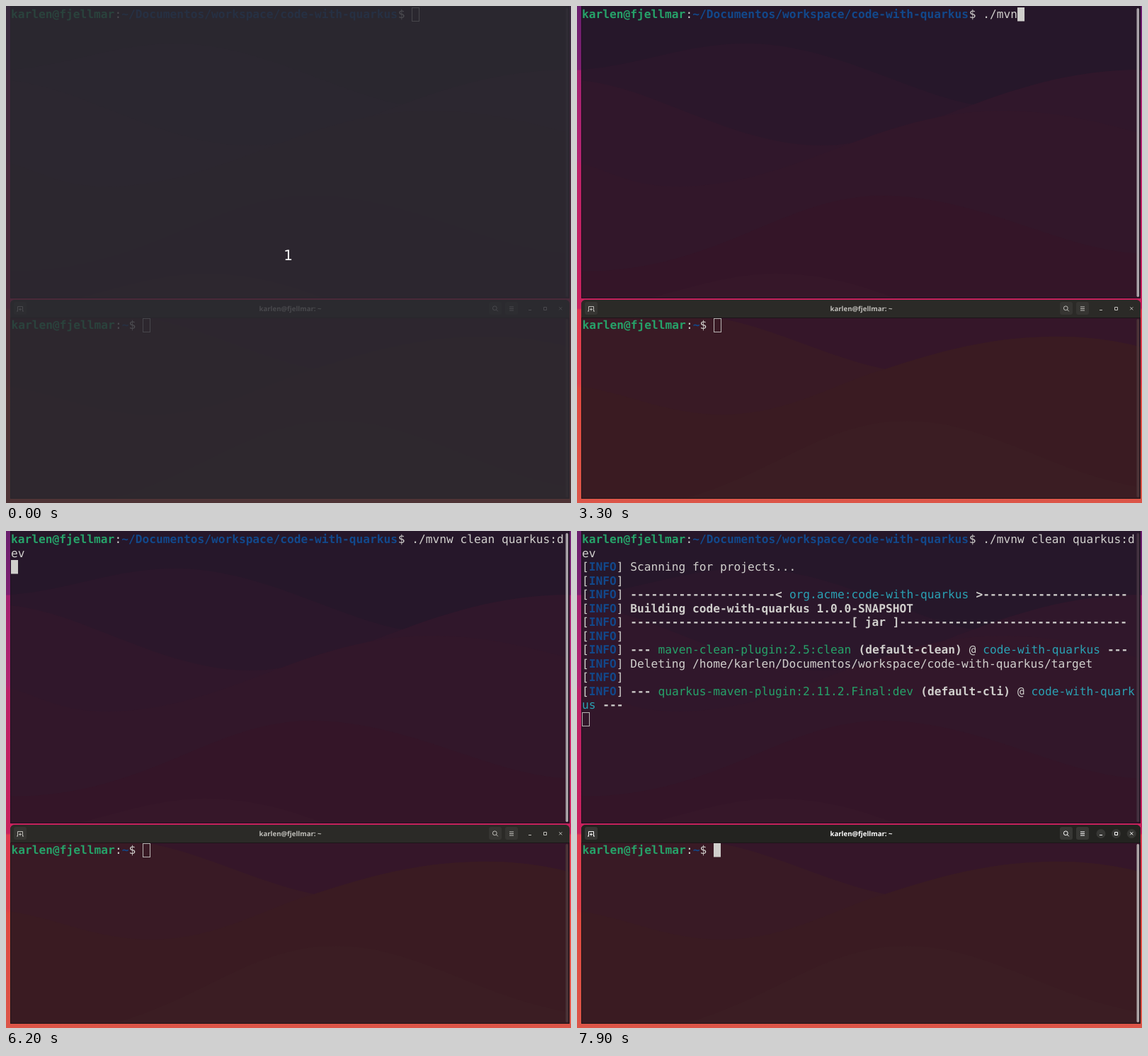
Recreate the animation shown at these times as an HTML page. Size 798 by 702 pixels, loop 8 s.

```html
<!DOCTYPE html>
<html lang="en">
<head>
<meta charset="utf-8">
<title>Terminal session</title>
<style>
  html, body { margin: 0; width: 100%; height: 100%; overflow: hidden; background: #2b172b; }
  svg { display: block; }
  text { white-space: pre; text-rendering: geometricPrecision; }
  .term { font: 16.21px "DejaVu Sans Mono", monospace; fill: #d0cfcc; }
  .b { font-weight: 700; }
  .p { font-weight: 700; fill: #26a269; }
  .d { font-weight: 700; fill: #12488b; }
  .g { fill: #26a269; }
  .c { fill: #2aa1b3; }
  .title { font: 700 9.6px "Noto Sans", "Open Sans", sans-serif; text-anchor: middle; }
  .count { font: 20px "DejaVu Sans", sans-serif; text-anchor: middle; fill: #fff; }
  .icon { fill: none; stroke: currentColor; }
</style>
</head>
<body>
<svg width="798" height="702" viewBox="0 0 798 702">
  <defs>
    <linearGradient id="wall" x1="0" y1="0" x2="0" y2="1">
      <stop offset="0" stop-color="#6a1f6e"/>
      <stop offset=".128" stop-color="#7d1f70"/>
      <stop offset=".13" stop-color="#a3216f"/>
      <stop offset=".31" stop-color="#b42471"/>
      <stop offset=".32" stop-color="#bd2268"/>
      <stop offset=".608" stop-color="#c8215c"/>
      <stop offset=".612" stop-color="#e03a50"/>
      <stop offset=".76" stop-color="#dd3f48"/>
      <stop offset=".77" stop-color="#e0483f"/>
      <stop offset="1" stop-color="#dc5548"/>
    </linearGradient>
    <clipPath id="topClip"><rect x="6" width="790" height="413"/></clipPath>
    <clipPath id="lowClip"><path d="M6 696V422Q6 415 13 415H789Q796 415 796 422V696Z"/></clipPath>
    <g id="buttons">
      <g class="icon">
        <path d="M16.5 431V424.5H23.5V431M15 431H17M23 431H25M20 426.5V430.5M18 428.5H22"/>
        <circle cx="690.3" cy="426.8" r="2.9"/>
        <path d="M692.5 429L694.8 431.3M711 425H717M711 427.5H717M711 430H717"/>
        <path d="M738 429.5H742M759.5 425.5H763.5V429.5H759.5ZM781.3 425.3L785.3 429.3M785.3 425.3L781.3 429.3"/>
      </g>
      <text class="title" x="401.5" y="431" fill="currentColor"></text>
    </g>
  </defs>

  <rect width="798" height="702" fill="url(#wall)"/>

  <g clip-path="url(#topClip)">
    <rect width="798" height="413" fill="#26172a"/>
    <path fill="#2b172b" d="M6 90C90 84 150 53 240 53C360 53 470 125 565 140C620 150 700 165 798 170V413H6Z"/>
    <path fill="#30172b" d="M6 105C110 115 220 197 345 197C480 197 600 90 798 90V413H6Z"/>
    <path fill="#32172a" d="M6 222C50 235 80 255 140 255C310 255 420 148 600 148C680 148 740 165 798 180V413H6Z"/>
    <path fill="#341528" d="M6 375C200 375 290 268 430 268C570 268 680 345 798 350V413H6Z"/>
    <path fill="#361729" d="M100 413C170 395 220 378 280 378C340 378 390 390 450 413Z"/>
    <path fill="none" stroke="#1c1020" d="M6.5 0V412.5H795.5V0"/>
  </g>

  <g clip-path="url(#lowClip)">
    <rect y="415" width="798" height="281" fill="#351629"/>
    <path fill="#391a25" d="M6 441H200C280 455 350 495 435 513C520 485 590 467 680 467C730 467 770 475 798 482V696H6Z"/>
    <path fill="#3a1b22" d="M6 537C80 550 130 577 205 577C300 577 370 530 435 513C520 485 590 467 680 467C730 467 770 475 798 482V696H6Z"/>
    <path fill="#3b1d23" d="M150 696C280 660 350 586 465 586C580 586 670 660 798 680V696Z"/>
    <rect y="415" width="798" height="26" fill="#2b2a27"/>
    <g fill="#363532">
      <rect x="11" y="418" width="18" height="18" rx="3"/>
      <rect x="682" y="418" width="18" height="18" rx="3"/>
      <rect x="705" y="418" width="18" height="18" rx="3"/>
    </g>
    <use href="#buttons" color="#c0bfba"/>
    <g id="active">
      <rect y="415" width="798" height="26" fill="#232320"/>
      <g fill="#373734">
        <rect x="11" y="418" width="18" height="18" rx="3"/>
        <rect x="682" y="418" width="18" height="18" rx="3"/>
        <rect x="705" y="418" width="18" height="18" rx="3"/>
        <circle cx="740" cy="427.5" r="6.5"/>
        <circle cx="761.5" cy="427.5" r="6.5"/>
        <circle cx="783.3" cy="427.5" r="6.5"/>
      </g>
      <use href="#buttons" color="#fff"/>
    </g>
    <path fill="none" stroke="#1c1518" d="M6 440.5H796M6.5 441V695.5H795.5V441"/>
  </g>

  <rect id="topBar" x="790.5" y="3" width="3.5" height="408" rx="1.7"/>
  <rect id="lowBar" x="790.5" y="442" width="3.5" height="252" rx="1.7"/>
  <g id="screen" class="term"></g>
  <rect id="topCursor"/>
  <rect id="lowCursor"/>

  <g id="veil">
    <rect width="798" height="702" fill="#2b2b31" opacity=".8"/>
    <text class="count" x="398.5" y="359">1</text>
  </g>
</svg>

<script>
const LOOP = 8000, CW = 9.763, LH = 19.5, LEFT = 7, TOP = 2;
const USER = "karlen", HOST = "fjellmar";
const COMMAND = "./mvnw clean quarkus:dev", WRAP = 22;
const $ = id => document.getElementById(id);
const dash = n => "-".repeat(n);

// Runs alternate style and text; an empty style is plain.
const info = (...runs) => ["", "[", "d", "INFO", "", "] ", ...runs];
const prompt = dir => ["p", `${USER}@${HOST}`, "", ":", "d", dir, "", "$ "];
const output = [
  info("", "Scanning for projects..."),
  info(),
  info("b", dash(21) + "< ", "c", "org.acme:code-with-quarkus", "b", " >" + dash(21)),
  info("b", "Building code-with-quarkus 1.0.0-SNAPSHOT"),
  info("b", dash(32) + "[ jar ]" + dash(33)),
  info(),
  info("b", "--- ", "g", "maven-clean-plugin:2.5:clean", "b", " (default-clean)", "", " @ ",
    "c", "code-with-quarkus", "b", " ---"),
  info("", `Deleting /home/${USER}/Documentos/workspace/code-with-quarkus/target`),
  info(),
  info("b", "--- ", "g", "quarkus-maven-plugin:2.11.2.Final:dev", "b", " (default-cli)", "", " @ ",
    "c", "code-with-quark"),
  ["c", "us", "b", " ---"]
];

// time, typed characters, output rows, cursor [column, row] or null, flags:
// v veil, s solid upper cursor, u upper scrollbar, f lower cursor focused, a lower window active
const steps = [
  [0, 0, 0, [58, 0], "v"],
  [100, 0, 0, [58, 0], ""],
  [2600, 0, 0, [58, 0], "s"],
  [2700, 0, 0, [58, 0], "su"],
  [3200, 0, 0, null, "su"],
  [3300, 5, 0, [63, 0], "su"],
  [3900, 5, 0, null, "su"],
  [4000, 24, 0, [2, 1], "su"],
  [4500, 24, 0, null, "su"],
  [5000, 24, 0, [2, 1], "su"],
  [5100, 24, 0, [0, 2], "su"],
  [5600, 24, 0, null, "su"],
  [6200, 24, 0, [0, 2], "su"],
  [6300, 24, 1, [0, 3], "su"],
  [6900, 24, 1, null, "su"],
  [7200, 24, 5, null, "su"],
  [7400, 24, 5, [0, 7], "su"],
  [7700, 24, 8, [0, 10], "uf"],
  [7900, 24, 11, [0, 13], "fa"]
];

function addText(runs, x, top) {
  const row = document.createElementNS("http://www.w3.org/2000/svg", "g");
  for (let i = 0; i < runs.length; i += 2) {
    const t = document.createElementNS("http://www.w3.org/2000/svg", "text");
    t.setAttribute("class", runs[i]);
    t.setAttribute("x", x);
    t.setAttribute("y", top + 15);
    t.textContent = runs[i + 1];
    x += runs[i + 1].length * CW;
    row.append(t);
  }
  $("screen").append(row);
  return row;
}

const rowTop = r => TOP + r * LH;
const set = (el, attrs) => Object.entries(attrs).forEach(([k, v]) => el.setAttribute(k, v));
const show = (el, on) => { el.style.display = on ? "" : "none"; };

function placeCursor(el, x, y, solid) {
  set(el, solid
    ? { x, y, width: 10, height: 19.5, fill: "#d0cfcc", stroke: "none" }
    : { x: Math.round(x) + .5, y: Math.round(y) + .5, width: 10, height: 19, fill: "none", stroke: "#b9b5b4" });
}

document.querySelector(".title").textContent = `${USER}@${HOST}: ~`;
addText(prompt("~/Documentos/workspace/code-with-quarkus"), LEFT, TOP);
addText(prompt("~"), LEFT + .6, 441);
const typed = [
  addText(["", ""], LEFT + 58 * CW, TOP).firstChild,
  addText(["", ""], LEFT, rowTop(1)).firstChild
];
const rows = output.map((runs, i) => addText(runs, LEFT, rowTop(i + 2)));

function apply([, chars, count, cursor, flags]) {
  const has = f => flags.includes(f);
  const text = COMMAND.slice(0, chars);
  typed[0].textContent = text.slice(0, WRAP);
  typed[1].textContent = text.slice(WRAP);
  rows.forEach((row, i) => show(row, i < count));
  show($("topCursor"), cursor);
  if (cursor) placeCursor($("topCursor"), LEFT + cursor[0] * CW, rowTop(cursor[1]), has("s"));
  placeCursor($("lowCursor"), 193, 441, has("f"));
  $("topBar").setAttribute("fill", has("u") ? "#a8a3a8" : "#42323f");
  $("lowBar").setAttribute("fill", has("a") ? "#aaa4a5" : "#4a3337");
  $("active").setAttribute("opacity", has("a") ? 1 : has("f") ? .5 : 0);
  show($("veil"), has("v"));
}

let current;
const start = performance.now();
function tick() {
  const t = (performance.now() - start) % LOOP;
  const step = steps.findLast(s => s[0] <= t);
  if (step !== current) apply(current = step);
  requestAnimationFrame(tick);
}
tick();
</script>
</body>
</html>
```
